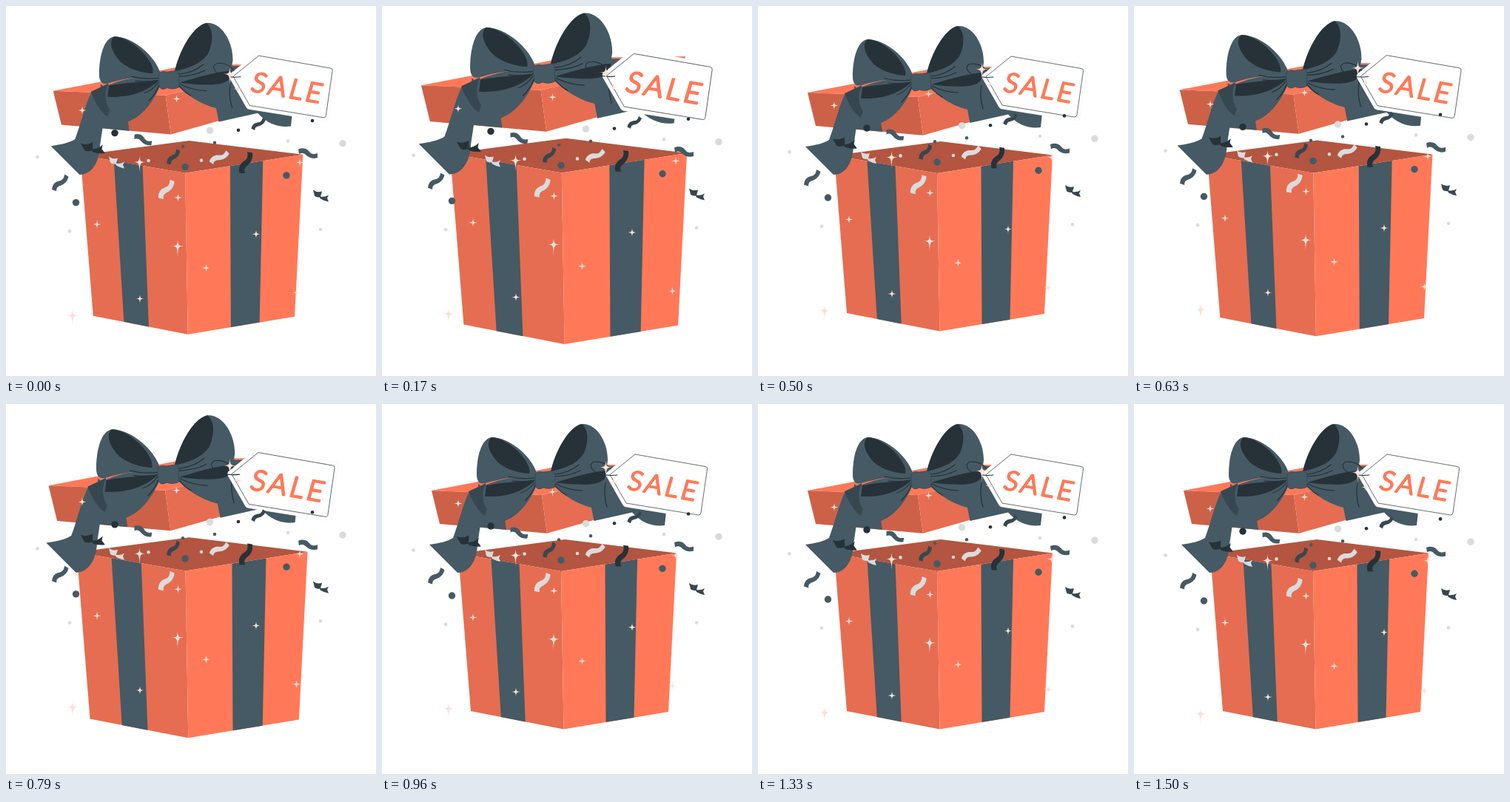
Recreate the animation shown at these times as an HTML page. Size 500x500 px, loop 1.54 s.

```html
<!DOCTYPE html>
<html lang="en">
<head>
<meta charset="utf-8">
<title>Gift sale</title>
<style>
  html, body { margin: 0; width: 100%; height: 100%; overflow: hidden; background: #fff; }
  svg { display: block; width: 100%; height: 100%; }
  .coral { fill: #ff7959; }
  .shade { fill: #e66d51; }
  .teal { fill: #455a64; }
  .slate { fill: #37474f; }
  .dark { fill: #263238; }
  .pale { fill: #dbdbdb; }
  .star { fill: #ffe0d7; }
  .crease { fill: none; stroke: #263238; stroke-width: 1.2; stroke-linecap: round; }
  .card { fill: #fff; stroke-linejoin: round; }
  .sale { font: 300 36px Lato, sans-serif; letter-spacing: 4px; text-anchor: middle;
          fill: #ff7959; stroke: #ff7959; stroke-width: 2.5; stroke-linejoin: round; }
</style>
</head>
<body>
<svg viewBox="0 0 500 500">
  <g id="gift">
    <!-- box -->
    <path fill="#b35540" d="M103 202L247 183L398 201.5L242 226Z"/>
    <path class="shade" d="M103 202L242 226L245.5 439.5L120 415Z"/>
    <path class="coral" d="M242 226L398 201.5L387 416L245.5 439.5Z"/>
    <path class="teal" d="M147.500 209.7L185.500 216.2L193.700 429.5L160.800 423Z"/>
    <path class="teal" d="M301.5 216.7L345 209.8L340.5 423.8L302.5 430Z"/>
    <!-- lid -->
    <path class="coral" d="M67 117L245 83L396 81L216 123Z"/>
    <path fill="#cc6148" d="M67 117L216 123L223 174.700L78 162Z"/>
    <path class="shade" d="M216 123L396 81L388 128L223 174.700Z"/>
    <path class="teal" d="M262 105L300 84L322 84L345 115L384 145L382 164C368 166 352 162 338 146.500L286.500 158L281 130Z"/>
    <path class="teal" d="M130 108L162 130L168 169.900L128 166Z"/>
    <!-- hanging ribbon -->
    <path class="teal" d="M140 107L118 118C109 136 104 160 96 181C88 186 78 188 64 190L102 228C118 228 128 212 129 190L133 163L142 150Z"/>
    <path class="slate" d="M117 118L140 108L147 126L139 151C130 145 123 134 117 118Z"/>
    <!-- bow -->
    <path class="teal" d="M208 99C180 96 155 103 139 110C133 125 136 150 166 158C187 150 200 130 209 110Z"/>
    <path class="teal" d="M232 96C260 92 290 80 305 76C301 105 300 125 304 141C284 145 252 131 232 110Z"/>
    <path class="dark" d="M141 110C160 106 190 105 207 103C192 117 172 126 139 125Z"/>
    <path class="dark" d="M234 106C255 100 280 92 303 90C305 98 300 106 285 108C268 110 250 108 234 106Z"/>
    <path class="teal" d="M209 93C202 71 173 45 148 45C134 47 128 72 128 95C128 105 132 109 140 107C165 99 190 97 208 100Z"/>
    <path class="teal" d="M228 93C234 64 252 31 270 27C292 26 306 55 305 77C290 88 260 92 232 99Z"/>
    <path class="dark" d="M148 45C140 51 144 66 157 79C169 89 185 93 199 94C203 79 172 46 148 45Z"/>
    <path class="dark" d="M228 91C234 64 252 31 270 27C279 34 280 51 272 68C262 82 246 87 228 91Z"/>
    <path class="crease" d="M171 98Q188 102 206 100M176 104Q190 106 206 103M207 110Q203 121 194 130M206 106Q198 117 188 120M234 95Q253 93 266 82M234 98Q254 97 268 90M235 108Q250 116 270 117M234 110Q241 119 249 123M302 107Q299 122 304 139"/>
    <path class="teal" stroke="#37474f" stroke-width=".8" d="M207 94Q211 90 217 92Q226 91 231 90Q235 95 233 103L234 112Q226 116 218 113Q211 117 208 112Q206 103 207 94Z"/>
  </g>
  <g id="tag">
    <path class="card" stroke="#f3f3f3" stroke-width="10.5" d="M308 95.5L342 68L439 85L430 150L330 134Z"/>
    <path class="card" stroke="#fff" stroke-width="9.5" d="M308 95.5L342 68L439 85L430 150L330 134Z"/>
    <path class="card" stroke="#263238" stroke-width=".7" d="M308 95.5L342 68L437 84.5Q440 85 439.5 88L431 147Q430.500 150.5 427.500 150L330 134Z"/>
    <path class="crease" style="stroke-width:1.1" d="M318 96C300 98 283 93 282 83C284 74 303 78 309 88"/>
    <text class="sale" transform="translate(378 123) rotate(10) skewX(-6)">SALE</text>
  </g>
  <g id="bits"></g>
</svg>
<script>
const $ = id => document.getElementById(id);
const bits = $('bits');

function add(tag, attrs) {
  const el = document.createElementNS('http://www.w3.org/2000/svg', tag);
  for (const k in attrs) el.setAttribute(k, attrs[k]);
  bits.appendChild(el);
}

const WAVE = 'M-13 -5.5C-5 -9 0 -5 3 -1C6 2 10 1 13 0L13 6C7 8 1 6 -3 2C-6 -1 -9 -1 -12 1Z';
const TWIST = 'M-11 -8Q-6 -4 1 -6L-1 1Q5 2 10 -1L8 3L10 8Q4 7 -1 4L-2 2Q-7 2 -9 0Z';

const strip = (shape, cls, x, y, turn, size) =>
  add('path', { d: shape, class: cls, transform: `translate(${x} ${y}) rotate(${turn}) scale(${size})` });

const dot = (cls, r, ...spots) =>
  spots.forEach(([cx, cy]) => add('circle', { class: cls, r, cx, cy }));

// four-pointed sparkle with its own reach up, sideways and down
const star = (x, y, up = 5.7, side = 5.5, down = up) =>
  add('path', { class: 'star', transform: `translate(${x} ${y})`,
    d: `M0 ${-up}C.4 -1.2 1.2 -.4 ${side} 0C1.2 .4 .4 1.2 0 ${down}` +
       `C-.4 1.2 -1.2 .4 ${-side} 0C-1.2 -.4 -.4 -1.2 0 ${-up}Z` });

strip(WAVE, 'teal', 185, 181, 8, 0.95);
strip(WAVE, 'teal', 73, 239.5, -62, 1);
strip(TWIST, 'dark', 118, 192.5, -15, 1.35);
strip(TWIST, 'pale', 150, 212, 0, 1);
strip(WAVE, 'pale', 216.5, 248.5, -70, 1.1);
strip(WAVE, 'slate', 226, 204.5, -69, 0.88);
strip(WAVE, 'pale', 288, 205, -45, 1.02);
strip(WAVE, 'dark', 324, 212.5, -82, 1.15);
strip(WAVE, 'slate', 341, 160, -55, 0.8);
strip(WAVE, 'teal', 408, 199.5, 0, 1);
strip(TWIST, 'slate', 426, 257, 0, 1);

dot('dark', 4.7, [147, 172]);
dot('dark', 2.3, [314, 168.2], [414, 155.4]);
dot('teal', 4.7, [94.5, 266], [242, 218], [379, 229.3]);
dot('teal', 2.2, [239, 190.3], [282, 185.2]);
dot('pale', 4.7, [275.5, 168.7], [455, 186.2]);
dot('pale', 2.3, [42.5, 204.4], [86, 304.8], [192.5, 209.4], [264, 209], [381, 183], [425, 302.4]);

[[103, 141.4], [230.5, 125.8], [123, 295.4], [232.5, 259.4], [338, 308.6], [270.5, 354.3],
 [181, 396], [392.5, 387.8], [397, 211.8], [313, 112.4]].forEach(p => star(...p));
[[180.5, 211.4], [232, 324.8], [90, 418.7]].forEach(([x, y]) => star(x, y, 8.5, 8.3, 15));
star(302.5, 92.5, 10, 9, 15);

const LOOP = 1540, BEAT = 1500, STEP = 1000 / 24;

// double heartbeat, then rest: [share of beat, scale]
const KEYS = [[0, 1], [0.1, 1.1], [0.3, 1], [0.4, 1], [0.5, 1.1], [0.6, 1], [1, 1]];

function pulse(p) {
  const i = Math.max(1, KEYS.findIndex(k => p <= k[0]));
  const [a, from] = KEYS[i - 1], [b, to] = KEYS[i];
  return from + (to - from) * (p - a) / (b - a);
}

const zoom = (id, x, y, s) =>
  $(id).setAttribute('transform', `translate(${x} ${y}) scale(${s}) translate(${-x} ${-y})`);

function draw(ms) {
  const t = Math.floor((ms % LOOP + 3) / STEP) * STEP;
  const p = Math.min(t * 0.99 + 30, BEAT) / BEAT;
  const s = pulse(p);
  zoom('gift', 232.5, 233, s);
  zoom('tag', 361, 110, s);
  const lift = 10 * (1 - Math.abs(2 * p - 1));
  bits.setAttribute('transform', `translate(0 ${-lift})`);
}

function tick(now) {
  draw(now);
  requestAnimationFrame(tick);
}
draw(0);
requestAnimationFrame(tick);
</script>
</body>
</html>
```
